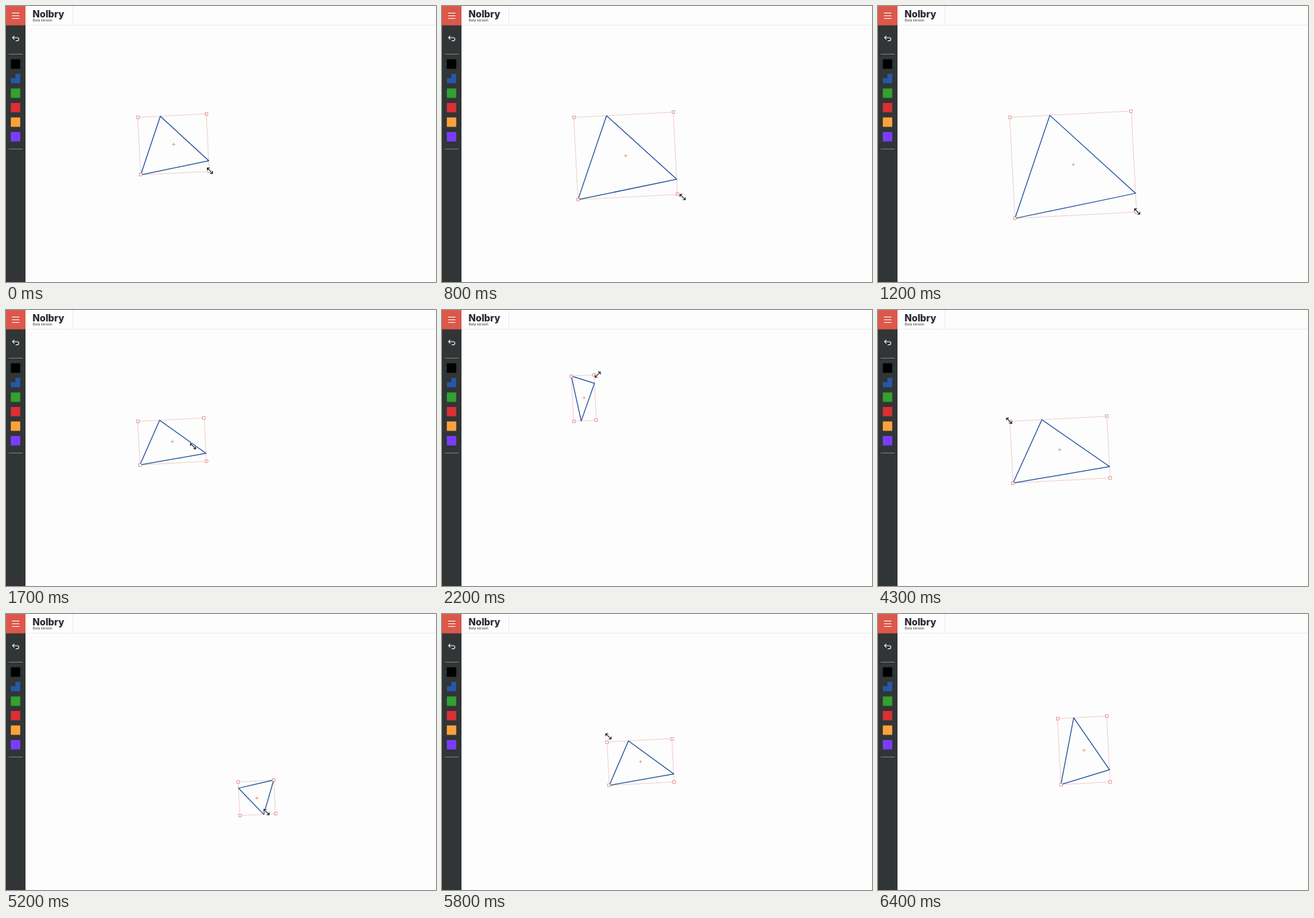
Animation, 640 px wide and 410 px high, one loop 6500 ms. Source, as an HTML page:

```html
<!DOCTYPE html>
<html lang="en">
<head>
<meta charset="utf-8">
<title>Shape resize</title>
<style>
  html, body { margin: 0; width: 100%; height: 100%; overflow: hidden; background: #fdfdfd; }
  svg { display: block; width: 100vw; height: 100vh; }
  .brand { font: 800 14px Inter, sans-serif; fill: #2b2b2e; }
  .tag { font: 500 4.6px Inter, sans-serif; letter-spacing: .14px; fill: #3c3c40; }
</style>
</head>
<body>
<svg viewBox="0 0 640 410">
  <rect width="640" height="410" fill="#fdfdfd"/>
  <path d="M29 28.5H640M99.5 0V28" stroke="#ededed"/>
  <rect width="29" height="410" fill="#313536"/>
  <rect width="29" height="28.7" fill="#dc584b"/>
  <path d="M9 10.5H20M9 14.5H20M9 18.5H20" stroke="#fff" stroke-width="1.2"/>
  <path d="M12.4 44.3L9.7 47L12.4 49.7M10 47H16.8A2.3 2.3 0 0 1 16.8 51.6H14.5" fill="none" stroke="#f4f4f4" stroke-width="1.1"/>
  <path d="M4 71.5H25M4 212.5H25" stroke="#7c8081"/>
  <g id="swatches"></g>
  <text class="brand" x="39.5" y="17.2">Nolbry</text>
  <text class="tag" x="40" y="22.5">Beta version</text>

  <path id="frame" fill="none" stroke="#e5a097" stroke-width=".7" stroke-dasharray="1.6 .6"/>
  <path id="shape" fill="none" stroke="#1b4c99" stroke-width="1.25" stroke-linejoin="round"/>
  <path id="cross" d="M-2.5 0H2.5M0 -2.5V2.5" stroke-width=".8"/>
  <g id="handles" fill="#fff" stroke="#e0918a" stroke-width=".85"></g>
  <g id="resize" fill="none">
    <path id="arrows" d="M-5.5 0H5.5M-3 -2.6L-5.6 0L-3 2.6M3 -2.6L5.6 0L3 2.6" stroke="#fff" stroke-width="2.6"/>
    <use href="#arrows" style="stroke:#222"/>
  </g>
  <path id="arrow" d="M0 0V12.5L3 9.8L5 14.3L7 13.4L5.1 9H9Z" fill="#111" stroke="#fff" stroke-width=".8"/>
</svg>
<script>
const NS = 'http://www.w3.org/2000/svg';
const LOOP = 6500, STEP = 100, LEAD = 50;
const $ = id => document.getElementById(id);

function add(parent, tag, attrs) {
  const el = document.createElementNS(NS, tag);
  for (const k in attrs) el.setAttribute(k, attrs[k]);
  return parent.appendChild(el);
}

// Black line laid over the white outline of the resize cursor
$('resize').lastElementChild.remove();
add($('resize'), 'path', { d: $('arrows').getAttribute('d'), stroke: '#1c1c1c', 'stroke-width': 1.1 });

['#000', '#2658a5', '#33a02f', '#d92f35', '#ffa23d', '#7a3cff'].forEach((fill, i) => {
  const y = 79.2 + i * 21.6;
  const d = i === 1 ? `M14 ${y}h7.2v14H7.2v-7.5h6.8z` : `M7.2 ${y}h14v14h-14z`;
  add($('swatches'), 'path', { d, fill });
});
const handles = [0, 1, 2, 3].map(() => add($('handles'), 'rect', { x: -2, y: -2, width: 4, height: 4 }));

// Box axes, tilted by three degrees
const tilt = 3 * Math.PI / 180, C = Math.cos(tilt), S = Math.sin(tilt);
const place = ([x, y], a, b) => [x + a * C + b * S, y - a * S + b * C];

// Each drag: fixed corner, pulling direction, turning points [time, width, height]
const grow = {
  pin: [196, 165.5], dir: 1,
  turns: [[300, 102.2, 85.6], [1200, 181.2, 150.2], [1400, 180, 151], [2000, 20, -46],
    [2200, 33.9, -67.5], [2800, 95, 20], [2900, 101.8, 60.6], [3300, 144.7, 91.8]]
};
const flip = {
  pin: [345.5, 249.5], dir: -1,
  turns: [[4400, 144.7, 91.8], [5080, -70, -38], [5200, -53, -50], [5700, 100, 50], [6150, 73.4, 98]]
};

// Smooth motion through the turning points, never overshooting
function sample(keys, t) {
  const n = keys.length - 1;
  t = Math.min(Math.max(t, keys[0][0]), keys[n][0]);
  let i = 0;
  while (i < n - 1 && t > keys[i + 1][0]) i++;
  const span = keys[i + 1][0] - keys[i][0], u = (t - keys[i][0]) / span;
  return [1, 2].map(c => {
    const rate = j => j < 0 || j >= n ? 0 : (keys[j + 1][c] - keys[j][c]) / (keys[j + 1][0] - keys[j][0]);
    const slope = j => {
      const a = rate(j - 1), b = rate(j);
      return a * b > 0 ? 2 * a * b / (a + b) : 0;
    };
    const p = keys[i][c], q = keys[i + 1][c];
    return p + (q - p) * u * u * (3 - 2 * u)
      + span * u * (1 - u) * ((1 - u) * slope(i) - u * slope(i + 1));
  });
}

const poly = pts => 'M' + pts.map(p => p.map(v => v.toFixed(2)).join(' ')).join('L') + 'Z';
const snap = v => Math.round(v - .5) + .5;
const move = (el, [x, y], extra = '') => el.setAttribute('transform', `translate(${x} ${y})${extra}`);
const show = (el, on) => el.setAttribute('visibility', on ? 'visible' : 'hidden');

// The cursor runs slightly ahead of the corner it pulls
function pull({ pin, dir, turns }, t) {
  const [w, h] = sample(turns, t + LEAD);
  const [x, y] = place(pin, dir * w, dir * h);
  return [x + dir, y - 1];
}

// Free move from the released corner to the opposite one
function travel(t) {
  const from = pull(grow, 3300), to = pull(flip, 4300);
  const u = Math.min(1, (t - 3300) / 900), e = 1 - (1 - u) ** 2;
  return from.map((v, i) => v + (to[i] - v) * e);
}

function draw(t) {
  const drag = t < 4300 ? grow : flip;
  const [w, h] = sample(drag.turns, t);
  const origin = drag.dir > 0 ? drag.pin : place(drag.pin, -w, -h);
  const at = (a, b) => place(origin, a * w, b * h);
  const corners = [at(0, 0), at(1, 0), at(1, 1), at(0, 1)];

  $('frame').setAttribute('d', poly(corners));
  $('shape').setAttribute('d', poly([at(.33, 0), at(1, .815), at(0, 1)]));
  corners.forEach((p, i) => move(handles[i], p.map(snap)));

  const idle = t < 300 || (t >= 3400 && t < 4400);
  $('cross').setAttribute('stroke', idle ? '#a59a9a' : '#e28f88');
  move($('cross'), at(.5, .5).map(snap));

  const walking = t >= 3400 && t < 4200, leaving = t >= 6300;
  show($('arrow'), walking || leaving && t < 6400);
  show($('resize'), !walking && !leaving);
  const tip = walking ? travel(t) : leaving ? at(.33, 0) : pull(t < 4200 ? grow : flip, t);
  move($('arrow'), tip);
  move($('resize'), tip, ` rotate(${w * h < 0 ? -45 : 45})`);
}

const start = performance.now();
function tick() {
  const t = Math.max(0, performance.now() - start) % LOOP;
  draw(Math.floor(t / STEP) * STEP);
  requestAnimationFrame(tick);
}
tick();
</script>
</body>
</html>
```
